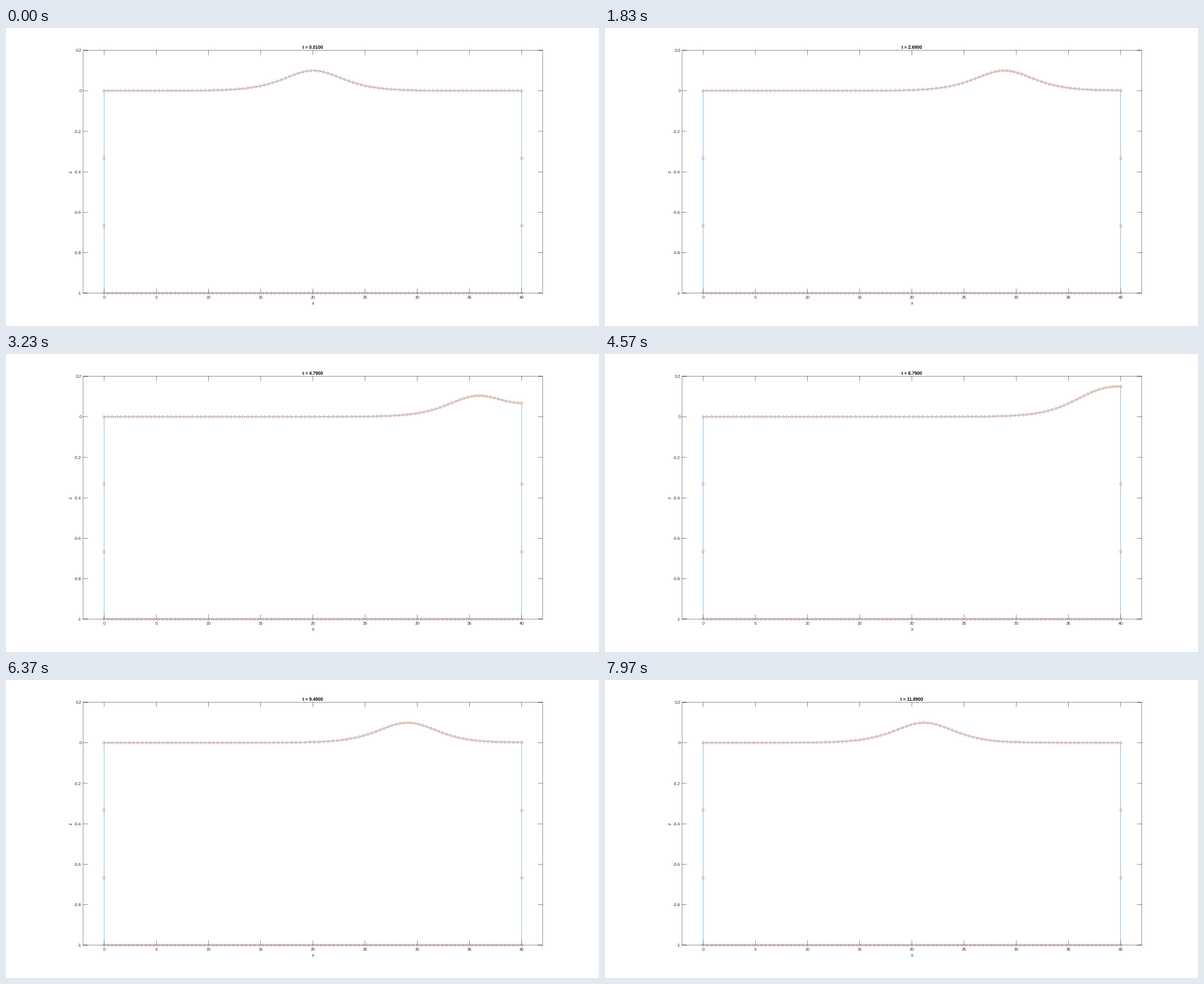
A matplotlib script for the animation above (8000 ms loop, 1000 px wide and 502 px high).

```python
"""Solitary wave in a closed tank, reflected by the right wall."""
import math

import numpy as np
import matplotlib.pyplot as plt
from matplotlib.animation import FuncAnimation

plt.rcParams.update({
    "font.family": "Liberation Sans",
    "text.hinting": "none",
    "path.simplify": False,
})

W_PX, H_PX, DPI = 1000, 502, 64
PT = 72 / DPI                      # points per pixel
TICK_MS, LOOP_MS = 20, 8000
STEP_MS, STEPS = 1000 / 30, 240    # the wave moves on 30 times a second

G, LENGTH, AMP = 9.81, 40.0, 0.1
N, ORDER = 256, 4
SURFACE_NODES, FLOOR_NODES = 100, 101

BLUE, ORANGE, GREY = "#0072BD", "#D95319", "#262626"

# Spectral grid on the tank and its mirror image
GRID = np.arange(N) * 2 * LENGTH / N
K = np.arange(N // 2 + 1) * math.pi / LENGTH
KEEP = K < 6
VERTICAL = [KEEP * K**j * (np.tanh(K) if j % 2 else 1) for j in range(ORDER + 1)]


def smooth(f):
    return np.fft.irfft(np.fft.rfft(f) * KEEP)


def ddx(f):
    return np.fft.irfft(np.fft.rfft(f) * KEEP * 1j * K)


def in_tank(f, x):
    half = N // 2 + 1
    return np.interp(x, GRID[:half], f[:half])


def solitary(x):
    """Third-order solitary wave on unit depth: elevation and speed."""
    a = AMP
    k = math.sqrt(0.75 * a) * (1 - 5 * a / 8 + 71 * a**2 / 128)
    s2 = 1 / np.cosh(k * x)**2
    t2 = 1 - s2
    eta = (a * s2 - 0.75 * a**2 * s2 * t2
           + a**3 * (5 / 8 * s2 * t2 - 101 / 80 * s2**2 * t2))
    speed = math.sqrt(G * (1 + a - a**2 / 20 - 3 * a**3 / 70))
    return eta, speed


def start_state():
    mirror = np.minimum(GRID, 2 * LENGTH - GRID)
    eta, c = solitary(mirror - LENGTH / 2)
    slope = ddx(eta)
    p = c - np.sqrt((c**2 - 2 * G * eta) * (1 + slope**2))
    p_hat = np.fft.rfft(np.where(GRID <= LENGTH, p, -p))
    phi_hat = np.zeros_like(p_hat)
    phi_hat[1:] = p_hat[1:] / (1j * K[1:])
    phi = np.fft.irfft(phi_hat * KEEP)
    return np.concatenate([smooth(eta), phi, np.linspace(0, LENGTH, SURFACE_NODES)])


def rates(state):
    """Time derivatives of elevation, surface potential and node positions."""
    eta, phi, nodes = np.split(state, [N, 2 * N])
    slope, px = ddx(eta), ddx(phi)
    power = [eta**j / math.factorial(j) for j in range(ORDER)]
    parts = [np.fft.rfft(phi)]
    w = np.zeros(N)

    def term(m, j, shift):
        return power[j] * np.fft.irfft(parts[m - j] * VERTICAL[j + shift])

    for m in range(ORDER):
        if m:
            parts.append(np.fft.rfft(-sum(term(m, j, 0) for j in range(1, m + 1))))
        w = w + sum(term(m, j, 1) for j in range(m + 1))

    stretch = 1 + slope**2
    eta_t = w * stretch - px * slope
    phi_t = -G * eta - px**2 / 2 + w**2 * stretch / 2
    u = px - w * slope
    return np.concatenate([smooth(eta_t), smooth(phi_t), in_tank(u, nodes)])


def advance(s, h):
    k1 = rates(s)
    k2 = rates(s + h / 2 * k1)
    k3 = rates(s + h / 2 * k2)
    k4 = rates(s + h * k3)
    return s + h / 6 * (k1 + 2 * k2 + 2 * k3 + k4)


def clock(step):
    return max(0.01, 0.05 * step - 0.06)


def simulate():
    state, t, out = start_state(), 0.0, []
    for step in range(STEPS):
        h = (clock(step) - t) / 2
        if h > 0:
            state = advance(advance(state, h), h)
            t = clock(step)
        x = state[2 * N:]
        out.append((x, in_tank(state[:N], x)))
    return out


surface = simulate()

fig = plt.figure(figsize=(W_PX / DPI, H_PX / DPI), dpi=DPI, facecolor="white")
ax = fig.add_axes([0.13, 0.11, 0.775, 0.815])
LEFT, RIGHT, FLOOR, TOP = -2, 42, -1, 0.2
ax.set(xlim=(LEFT, RIGHT), ylim=(FLOOR, TOP))
ax.axis("off")

PX_X = 0.775 * W_PX / (RIGHT - LEFT)     # pixels per unit
PX_Z = 0.815 * H_PX / (TOP - FLOOR)
X_TICKS = np.arange(0, 41, 5)
Z_TICKS = np.arange(-5, 2) / 5


def thin_line(color, width, zorder):
    line, = ax.plot([], [], color=color, lw=width * PT, zorder=zorder,
                    clip_on=False, snap=False)
    return line


def draw_box():
    tick_x, tick_z = 7.75 / PX_X, 7.75 / PX_Z
    strokes = [[(LEFT, FLOOR), (RIGHT, FLOOR), (RIGHT, TOP), (LEFT, TOP), (LEFT, FLOOR)]]
    for x in X_TICKS:
        strokes += [[(x, FLOOR), (x, FLOOR + tick_z)], [(x, TOP), (x, TOP - tick_z)]]
    for z in Z_TICKS:
        strokes += [[(LEFT, z), (LEFT + tick_x, z)], [(RIGHT, z), (RIGHT - tick_x, z)]]
    points = [p for s in strokes for p in s + [(np.nan, np.nan)]]
    thin_line(GREY, 0.5, 1).set_data(*zip(*points))


def label(x, y, text, size, **kw):
    """Text at a pixel position measured from the top left."""
    kw = {"ha": "center", "va": "baseline", "color": GREY, **kw}
    return fig.text(x / W_PX, 1 - y / H_PX, text, fontsize=size * PT, **kw)


draw_box()
for v in X_TICKS:
    label(130 + (v - LEFT) * PX_X, 456.4, f"{v}", 6.95)
for v in Z_TICKS:
    label(127.2, 0.075 * H_PX + (TOP - v) * PX_Z + 2.5, f"{v:g}", 6.95, ha="right")
label(517.5, 466.2, "x", 7.6)
label(109.2, 242.2, "z", 7.6, va="center", rotation=90)
title = label(517.5, 34.8, "", 7.65, color="black", weight="bold")

outline = thin_line(BLUE, 0.44, 2)
rings = thin_line(ORANGE, 0.44, 3)

angle = np.linspace(0, 2 * math.pi, 19)
RING_X = np.append(2.1 / PX_X * np.cos(angle), np.nan)
RING_Z = np.append(2.1 / PX_Z * np.sin(angle), np.nan)

# Right wall, floor and left wall, following the surface clockwise
SIDE = np.array([-1 / 3, -2 / 3])
FIXED_X = np.concatenate([[LENGTH] * 2, np.linspace(LENGTH, 0, FLOOR_NODES), [0, 0]])
FIXED_Z = np.concatenate([SIDE, np.full(FLOOR_NODES, FLOOR), SIDE[::-1]])


def draw(i):
    # Each frame shows the step on screen at its middle, to the nearest 10 ms
    step = int((i * TICK_MS + TICK_MS / 2 + 5) / STEP_MS)
    sx, sz = surface[step]
    x = np.concatenate([sx, FIXED_X])
    z = np.concatenate([sz, FIXED_Z])
    outline.set_data(np.append(x, x[0]), np.append(z, z[0]))
    rings.set_data((x[:, None] + RING_X).ravel(), (z[:, None] + RING_Z).ravel())
    title.set_text(f"t = {clock(step):.4f}")
    return outline, rings, title


anim = FuncAnimation(fig, draw, frames=LOOP_MS // TICK_MS, interval=TICK_MS,
                     repeat=True, repeat_delay=0, blit=False)
plt.show()
```
